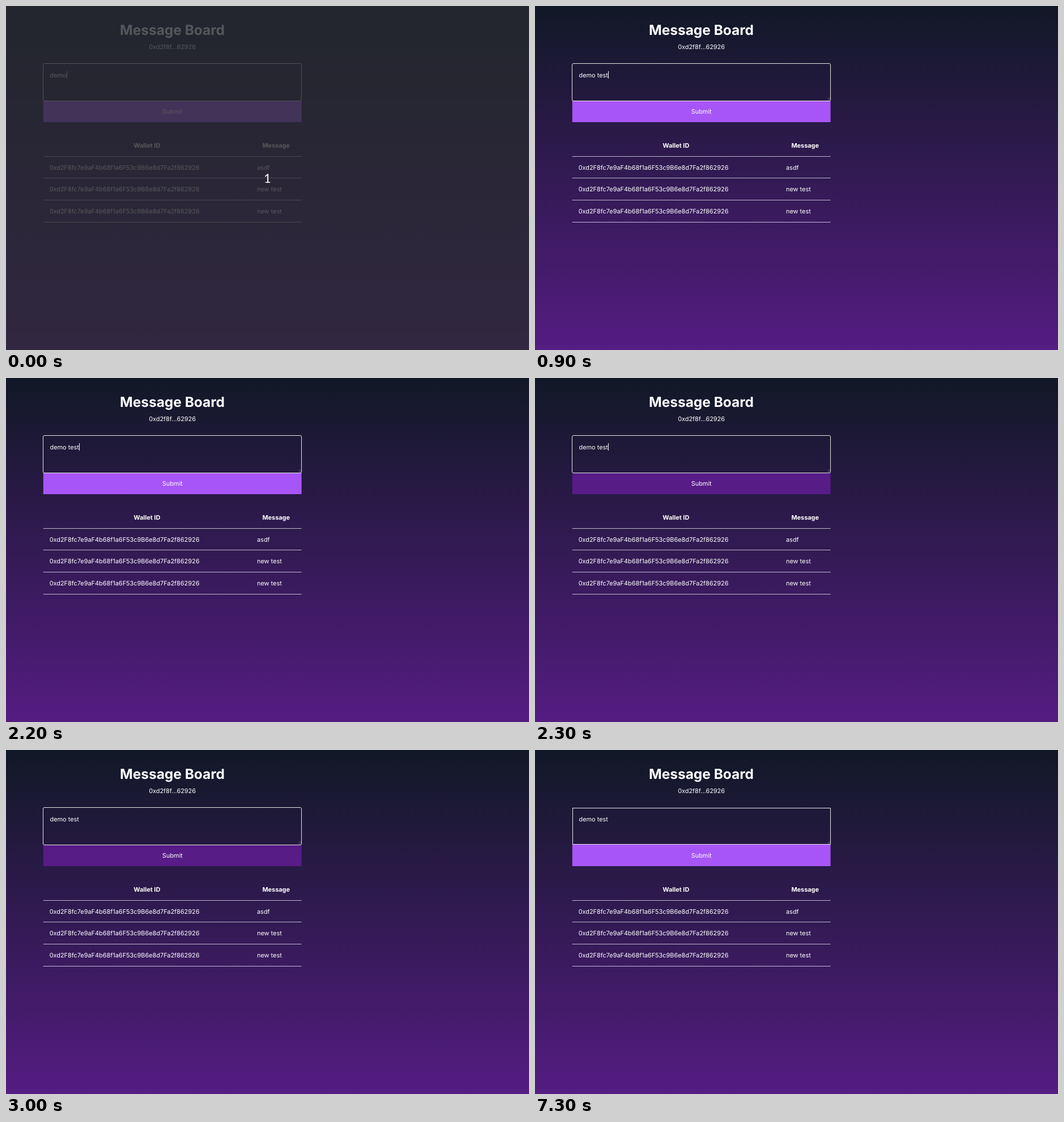
These frames come from a looping animation (923 px wide and 607 px high, 8000 ms). An HTML page:

```html
<!DOCTYPE html>
<html lang="en">
<head>
<meta charset="utf-8">
<title>Message Board</title>
<style>
  html, body { margin: 0; height: 100%; overflow: hidden; background: #111827; }
  svg { display: block; width: 100%; height: 100%; }
  text {
    font: 10.91px Inter, sans-serif;
    fill: #fff;
    white-space: pre;
    text-rendering: geometricPrecision;
  }
  .center { text-anchor: middle; }
  .bold { font-weight: 700; }
  .title { font-size: 24.45px; }
  .count { font: 22px Lato, sans-serif; }
</style>
</head>
<body>
<svg viewBox="0 0 923 607">
  <defs>
    <linearGradient id="sky" x2="0" y2="1">
      <stop stop-color="#111826"/>
      <stop offset="1" stop-color="#551c82"/>
    </linearGradient>
  </defs>
  <rect width="923" height="607" fill="url(#sky)"/>

  <text class="center bold title" x="293.5" y="51.1">Message Board</text>
  <text class="center" x="293.6" y="76">0xd2f8f...62926</text>

  <rect id="button" x="65.8" y="167" width="455.8" height="38"/>
  <text class="center" x="293.7" y="190">Submit</text>

  <g fill="none" stroke="#fff">
    <rect id="border" x="66.5" y="102.5" width="455" height="64" stroke-width=".9"/>
    <rect id="ring" x="65.5" y="101.5" width="456" height="66" rx="2.5" stroke="#e8e8e0"/>
    <path d="M516 165.5l4.5-4.5M518.5 165.5l2-2" stroke="#999" stroke-width=".6"/>
  </g>
  <text id="draft" x="77.5" y="125.7"></text>
  <rect id="caret" y="115" width="1" height="13" fill="#fff"/>

  <text class="center bold" x="248.8" y="249.8">Wallet ID</text>
  <text class="center bold" x="476.7" y="249.8">Message</text>
  <g id="table"></g>

  <g id="countdown">
    <rect width="923" height="607" fill="#282b30" fill-opacity=".79"/>
    <text class="center count" x="461.5" y="311.5">1</text>
  </g>
</svg>
<script>
const LOOP = 8000;
const WALLET = '0xd2F8fc7e9aF4b68f1a6F53c9B6e8d7Fa2f862926';
const KEY_TIMES = [400, 600, 700, 800, 900];
const $ = id => document.getElementById(id);
const within = (t, ...spans) => spans.some(([from, to]) => t >= from && t < to);
const show = (id, on) => $(id).setAttribute('visibility', on ? 'visible' : 'hidden');

const rule = y => `<rect x="65.8" y="${y}" width="455.8" height="1" fill="#e5e7eb" opacity=".78"/>`;
$('table').innerHTML = rule(265) + ['asdf', 'new test', 'new test'].map((message, i) => {
  const y = 288.6 + i * 38.7;
  return `<text x="76.7" y="${y}">${WALLET}</text>
    <text x="443" y="${y}">${message}</text>${rule(Math.floor(303.6 + i * 38.7))}`;
}).join('');

function draw(t) {
  const typed = KEY_TIMES.filter(time => t >= time).length;
  const focused = t < 3300;
  const hovered = within(t, [2300, 2500], [3000, 7300]);
  $('draft').textContent = 'demo test'.slice(0, 4 + typed);
  $('caret').setAttribute('x', Math.round(77.5 + $('draft').getComputedTextLength()));
  $('button').setAttribute('fill', hovered ? '#581c87' : '#a855f7');
  show('caret', within(t, [0, 1600], [2200, 2800]));
  show('ring', focused);
  show('border', !focused);
  show('countdown', t < 100);
}

function tick() {
  draw(performance.now() % LOOP);
  requestAnimationFrame(tick);
}
tick();
</script>
</body>
</html>
```
